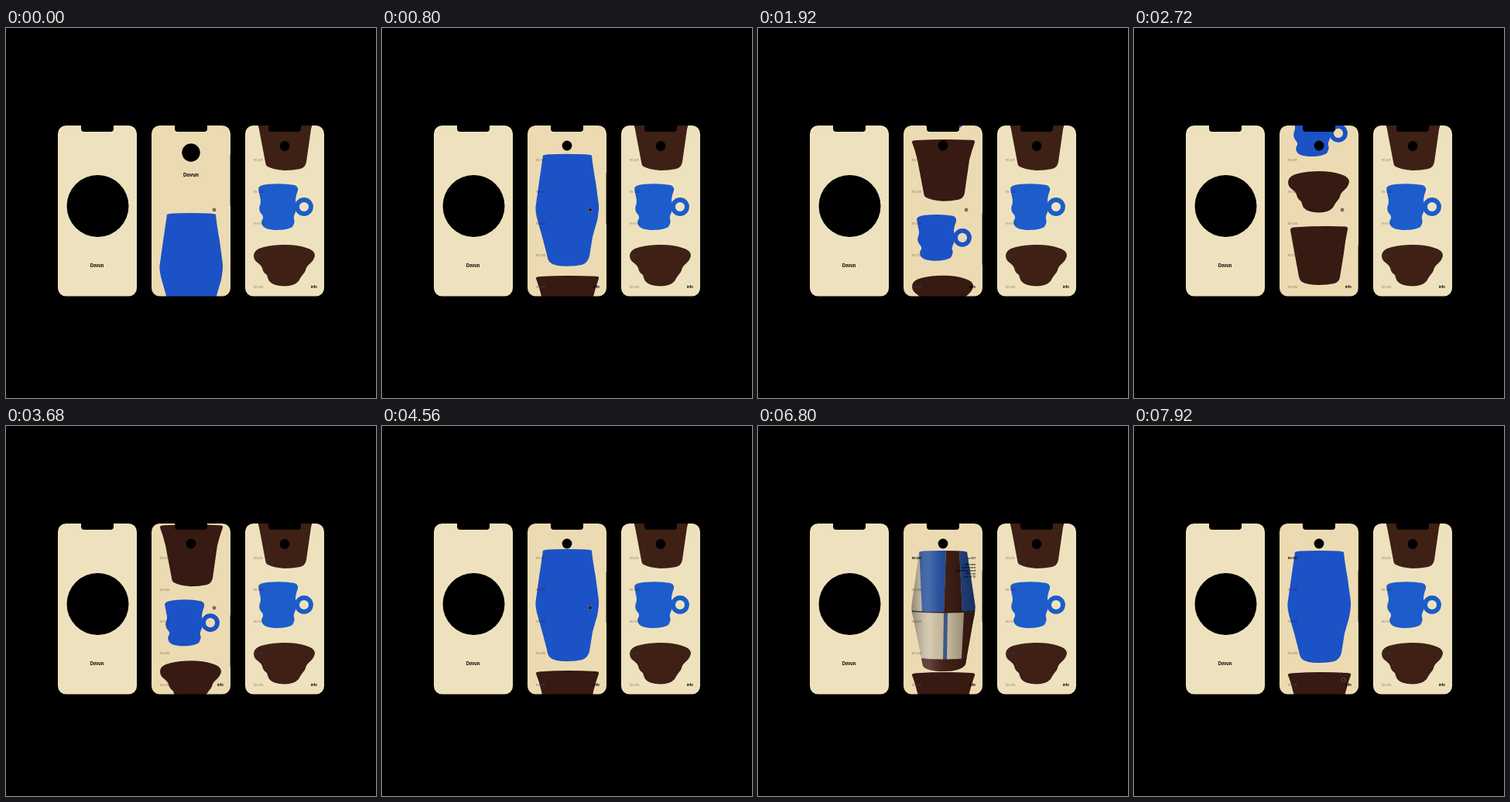
An HTML page for the animation above (8000 ms loop, 478 px wide and 478 px high).

```html
<!DOCTYPE html>
<html lang="en">
<head>
<meta charset="utf-8">
<title>Ceramics shop on three phones</title>
<style>
  html, body { margin: 0; width: 100%; height: 100%; overflow: hidden; background: #000; }
  svg { display: block; width: 100vw; height: 100vh; }
  text { font-family: Inter, Roboto, sans-serif; }
  .brand { font-weight: 700; text-anchor: middle; }
  .labels { font-size: 3.7px; fill: #6a6a6a; mix-blend-mode: difference; }
  .info { font-size: 4.3px; font-weight: 700; text-anchor: end; }
  .note { font-size: 3.6px; font-weight: 500; text-anchor: end; }
</style>
</head>
<body>
<svg id="stage" viewBox="0 0 478 478"></svg>
<script>
const LOOP = 8000;
const BRAND = 'Dovun';
const stage = document.getElementById('stage');

// Each piece: distance down the page, colour key and outline
const pieces = [
  { y: 239, tone: 'blue', d: 'M208 2Q209 0 239 0Q270 0 271 2Q272 14 276 36L280 66Q280.500 73 278 86L272 107L268 132Q266 140 259 143Q250 145 239 145Q222 145 217 140Q214 137 213 130L207 107L201 86Q198 75 198.500 68L203 36Z' },
  { y: 396, tone: 'brown', d: 'M199 4Q198 1.500 205 1.200Q240 -1 276 1Q281 1.200 280 4Q276 15 273 27L267 69Q266 76 259 78Q249 80 239 80Q224 79 217 75Q214.500 74 214 69L206 27Q203 14 199 4Z' },
  { y: 493, tone: 'blue', d: 'M205 6Q206 2 216 1Q236 -1 252 2Q257 4 256 9Q253 17 253 22Q255 30 253 37Q250 43 251 46Q253 49 249 56Q242 60 230 60Q212 60 210 53Q208 49 211 45Q212 42 208 38Q205 33 207 28Q209 24 207 17Z' },
  { y: 572, tone: 'brown', d: 'M199 14Q199 6 212 3Q224 0 239 0Q256 0 267 4Q278 7 278 14Q277 20 271 25Q267 28 266 33Q265 36 262 39Q259 43 257 47Q252 53 239 53.500Q224 53 219 47Q217 43 216 39Q211 36 210 30Q209 27 205 24Q199 20 199 14Z' },
  { y: 643, tone: 'brown', d: 'M202 5Q202 2 206 1.500Q240 -.5 273 .5Q277 1 276 4Q273 18 271 35L266 66Q265 72 259 74Q250 76 239 76Q224 76 217 72Q214 70 213 65L207 33Z' }
];
const handle = color => `<circle cx="264" cy="30" r="9" fill="none" stroke="${color}" stroke-width="5.800"/>`;

function shelf(id, tones, scroll, extra = '') {
  const body = pieces.map((p, i) =>
    `<g transform="translate(0 ${p.y})"><path class="piece" d="${p.d}" fill="${tones[p.tone]}"/>` +
    `${i === 2 ? handle(tones.blue) : ''}</g>`).join('');
  return `<g id="${id}" transform="translate(0 ${-scroll})">${body}${extra}</g>`;
}

function labels(id) {
  const rows = [0, 1, 2, 3, 4].map(i =>
    `<text x="199" y="${172.300 + i * 41}">no.02${i + 1}</text>`).join('');
  return `<g id="${id}" class="labels">${rows}</g>`;
}

function phone(dx, fill, content) {
  return `<g transform="translate(${dx} 0)"><g clip-path="url(#screen)">
    <rect x="188" y="126" width="102" height="221" fill="${fill}"/>${content}
    <path d="M218 125H260V130Q260 134 256 134H222Q218 134 218 130Z"/></g></g>`;
}

const vasePhoto = `<g id="photo" transform="translate(0 78)"><g clip-path="url(#vase)">
  <rect x="195" y="158" width="90" height="162" fill="#cfc1a3"/>
  <path d="M208 158H243L240 241H212Z" fill="#234f9f"/>
  <path d="M243 158H260L264 241H240Z" fill="#412016"/>
  <path d="M260 158H285V241H264Z" fill="#28509a"/>
  <path d="M240 241H245L244 302H239Z" fill="#3c5c93"/>
  <path d="M266 241H285V320H262Z" fill="#4a2519"/>
  <path d="M195 298Q240 305 285 298V320H195Z" fill="#452217"/>
  <path d="M195 239Q240 243 285 239" fill="none" stroke="#2b211f" stroke-width="1.500"/>
  <rect x="195" y="158" width="90" height="162" fill="url(#shade)"/></g></g>`;

const notes = ['no.021', '', 'tall vase', 'stoneware', 'glazed by hand', 'h 28 cm', 'one of 12']
  .map((s, i) => `<text x="281" y="${172.300 + i * 3.900}">${s}</text>`).join('');

const info = id => `<text id="${id}" class="info" x="281" y="336.300">info</text>`;
const brand = (id, x, y, size) =>
  `<text id="${id}" class="brand" x="${x}" y="${y}" font-size="${size}">${BRAND}</text>`;

stage.innerHTML = `
  <defs>
    <clipPath id="screen"><rect x="188" y="126" width="102" height="220.500" rx="10.500"/></clipPath>
    <clipPath id="vase"><path d="M208 163Q209 161 239 161Q269 161 270 163Q276 200 280.500 232Q281 241 278 252L268 308Q262 317 240 317Q218 317 213 310L201 250Q197 238 199 228Z"/></clipPath>
    <linearGradient id="shade">
      <stop offset="0" stop-color="#000" stop-opacity=".4"/>
      <stop offset=".3" stop-color="#fff" stop-opacity=".16"/>
      <stop offset=".55" stop-color="#000" stop-opacity=".05"/>
      <stop offset="1" stop-color="#000" stop-opacity=".45"/>
    </linearGradient>
  </defs>
  <rect width="478" height="478"/>
  ${phone(-121, '#eee2be', `<circle cx="239.500" cy="230" r="40"/>${brand('title', 238.500, 309.300, 5.500)}`)}
  ${phone(0, '#ecdbb2', `
    ${shelf('list', { blue: '#1b52c5', brown: '#371a12' }, 0, vasePhoto)}
    ${labels('tags')}
    <text id="picked" x="199" y="172.300" font-size="3.700" font-weight="600">no.021</text>
    <g id="notes" class="note">${notes}</g>
    ${info('more')}
    <circle id="mark" cx="239"/>
    ${brand('name', 239, 192.300, 6.300)}
    <rect id="thumb" x="289.300" width="1" height="66" fill="#4a4030" fill-opacity=".7"/>
    <circle id="cursor" r="2.400" stroke-width=".5"/>`)}
  ${phone(121, '#eee2be', `
    ${shelf('still', { blue: '#1c5ccb', brown: '#3e2014' }, 292)}
    ${labels('tags2')}${info('more2')}<circle cx="239" cy="152.500" r="6.400"/>`)}`;

const el = id => document.getElementById(id);
const set = (id, attrs) => {
  for (const k in attrs) el(id).setAttribute(k, attrs[k]);
};
const clamp = v => Math.max(0, Math.min(1, v));
const ramp = (v, a, b) => clamp((v - a) / (b - a));
const ease = v => v * v * (3 - 2 * v);
const mix = (a, b, k) => a + (b - a) * k;

// Scroll positions over time, joined by a monotone curve
const path = [[0, 0], [320, 0], [800, 76], [1920, 252], [2720, 387], [2820, 390],
  [3020, 390], [4560, 80], [5100, 78], [LOOP, 78]];
const slope = i => (path[i + 1][1] - path[i][1]) / (path[i + 1][0] - path[i][0]);
function tangent(i) {
  if (i === 0 || i === path.length - 1) return 0;
  const a = slope(i - 1), b = slope(i);
  return a * b <= 0 ? 0 : 2 * a * b / (a + b);
}
function scrollAt(t) {
  let i = 0;
  while (i < path.length - 2 && t >= path[i + 1][0]) i++;
  const [t0, y0] = path[i], [t1, y1] = path[i + 1];
  const h = t1 - t0, u = (t - t0) / h, v = 1 - u;
  return y0 * v * v * (1 + 2 * u) + y1 * u * u * (3 - 2 * u) +
    h * (tangent(i) * u * v * v - tangent(i + 1) * u * u * v);
}

const outlines = [...el('list').querySelectorAll('.piece')];
const probe = stage.createSVGPoint();
function isOver(x, y) {
  return outlines.some((o, i) => {
    probe.x = x;
    probe.y = y - pieces[i].y;
    return o.isPointInFill(probe);
  });
}

function draw(t) {
  const s = scrollAt(t);
  const open = ease(ramp(t, 5600, 6080)) * (1 - ease(ramp(t, 7400, 7840)));
  const shrink = ease(ramp(s, 0, 64));
  const shown = ramp(s, 25, 65);

  set('list', { transform: `translate(0 ${-s})` });
  set('photo', { opacity: open });
  outlines[0].setAttribute('opacity', 1 - ramp(open, .6, 1));
  set('notes', { opacity: open });
  set('picked', { opacity: ramp(t, 5600, 5800) });
  set('tags', { opacity: shown });
  set('more', { opacity: shown });
  set('mark', { cy: mix(161, 152, shrink), r: mix(11.7, 6.4, shrink) });
  set('name', { opacity: 1 - ramp(s, 4, 40), y: mix(192.3, 172, shrink) });
  set('thumb', { y: 164 + s * .3 });

  const go = ease(ramp(t, 7460, 7900));
  const x = mix(269, 270.7, go), y = mix(235, 328, go);
  const over = isOver(x, y + s);
  set('cursor', {
    cx: x, cy: y, opacity: 1 - open,
    fill: over ? '#14181f' : '#7b6e5c',
    stroke: over ? '#8d97a8' : 'none'
  });
}

function tick() {
  draw(performance.now() % LOOP);
  requestAnimationFrame(tick);
}
tick();
</script>
</body>
</html>
```
